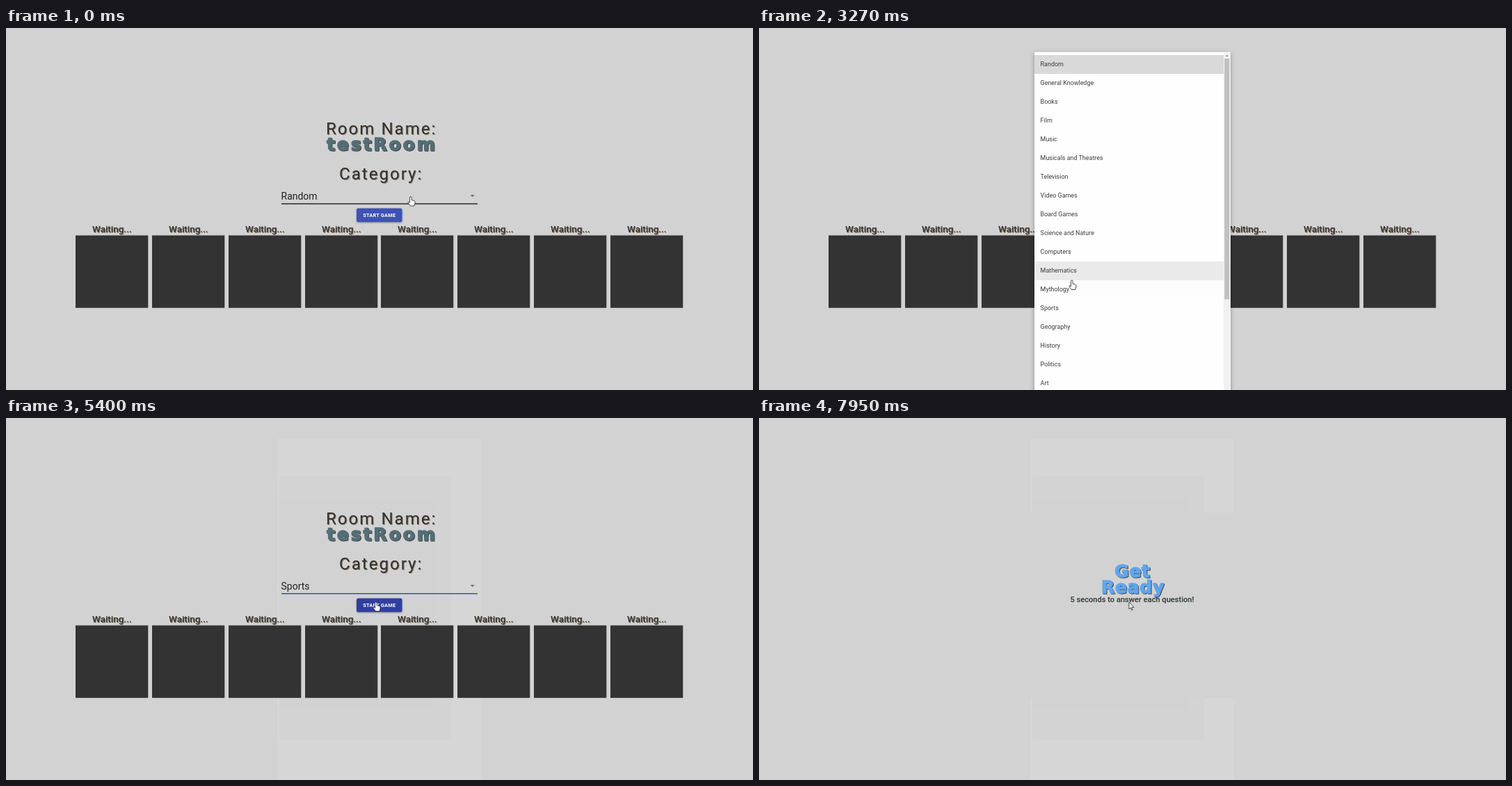
An HTML page for the animation above (8000 ms loop, 1074 px wide and 521 px high).

```html
<!DOCTYPE html>
<html lang="en">
<head>
<meta charset="utf-8">
<title>Quiz room</title>
<style>
  html, body { margin: 0; width: 100%; height: 100%; overflow: hidden; background: #d2d2d2; }
  svg { display: block; width: 100vw; height: 100vh; font-family: Roboto, sans-serif; }
  .mid { text-anchor: middle; }
  .title { font-size: 24px; letter-spacing: 2.05px; }
  .shade { fill: #333; filter: drop-shadow(1.1px 1.1px .2px #8d7b68); }
  .wait { font-size: 13.4px; font-weight: 500; }
  .fat { font: bold 25px "DejaVu Sans", sans-serif; stroke-width: 1.3; stroke-linejoin: round;
         filter: drop-shadow(1.2px 1.2px .3px #45484a); }
  .room-name { fill: #546e76; stroke: #546e76; letter-spacing: 2.9px; }
  .ready { fill: #60a6ee; stroke: #60a6ee; letter-spacing: .7px; }
  .note { font-size: 11.1px; font-weight: 500; fill: #3c4242; filter: drop-shadow(.6px .6px .3px #888); }
  .value { font-size: 14px; fill: #222; }
  .button { filter: drop-shadow(0 1px .8px rgba(0,0,0,.35)); }
  .label { font-size: 7.4px; font-weight: 700; letter-spacing: .2px; fill: #fff; }
  .item { font-size: 8.95px; fill: #3c3c3c; }
  .panel { fill: #fefefe; filter: drop-shadow(0 2px 3px rgba(0,0,0,.32)); }
</style>
</head>
<body>
<svg viewBox="0 0 1074 521">
  <rect width="1074" height="521" fill="#d2d2d2"/>

  <!-- faint trace the closed list leaves behind -->
  <g id="trace" fill="#fff" fill-rule="evenodd">
    <path opacity=".08" d="M390 30h293v491h-293zM393 84h247v379h-247z"/>
    <path opacity=".025" d="M393 84h247v379h-247zM393 115h224v305h-224z"/>
  </g>

  <g id="room">
    <text class="title shade" x="460" y="153">Room Name:</text>
    <text class="fat room-name" x="461" y="176">testRoom</text>
    <text class="title shade" x="479" y="217.5">Category:</text>
    <text class="value" id="value" x="395.5" y="246.5"></text>
    <path d="M667.7 240.2h6l-3 3z" fill="#666"/>
    <rect id="line" x="396" y="252.4" width="282"/>
    <rect id="focus" y="252.2" height="1.2" fill="#303f9f"/>
    <rect class="button" id="button" x="504" y="259.5" width="65.5" height="19.7" rx="2.2"/>
    <text class="label mid" x="536.8" y="271.9">START GAME</text>
    <g id="cards"></g>
  </g>

  <g id="menu">
    <rect class="panel" x="396" y="34.5" width="282" height="497" rx="2"/>
    <g id="items"></g>
    <clipPath id="row"><rect x="396" y="390" width="272" height="27"/></clipPath>
    <circle id="ripple" cx="436" cy="403" clip-path="url(#row)" opacity=".13"/>
    <rect x="668" y="35.5" width="9.5" height="495" fill="#f1f1f1"/>
    <rect x="669.2" y="44" width="7.2" height="346.5" fill="#c1c1c1"/>
    <path d="M670.8 41l2-2.5 2 2.5zM670.8 523l2 2.5 2-2.5z" fill="#888"/>
  </g>

  <g id="ready">
    <rect x="100" y="136" width="873" height="267" fill="#d2d2d2"/>
    <g id="message">
      <text class="fat ready mid" x="537" y="229">Get</text>
      <text class="fat ready mid" x="537.5" y="251.5">Ready</text>
      <text class="note mid" x="536.5" y="264.8">5 seconds to answer each question!</text>
    </g>
  </g>

  <g id="cursor" fill="#fff" stroke="#333" stroke-width=".9" stroke-linejoin="round">
    <path id="hand" d="M-1.4 7V1Q-1.4-.3-.1-.3T1.2 1V4.6L4.8 5.6Q6 6 6 7.5V9.5L5 13H-.6L-3.8 8.6Q-4.2 7.2-3 7L-1.4 8.4Z"/>
    <path id="arrow" d="M0 0V10L2.3 8L3.9 11.6L5.3 11L3.8 7.5H7Z"/>
  </g>
</svg>

<script>
const LOOP = 8000, FOCUS = 960, OPEN = 1112, PRESS = 4592, CLOSE = 4645, GROW = 424,
      BLUR = 6780, READY = 6950;
const ROW_TOP = 39, ROW = 27, SPORTS = 13;
const ITEMS = ['Random', 'General Knowledge', 'Books', 'Film', 'Music', 'Musicals and Theatres',
  'Television', 'Video Games', 'Board Games', 'Science and Nature', 'Computers', 'Mathematics',
  'Mythology', 'Sports', 'Geography', 'History', 'Politics', 'Art'];

// time, x, y of the pointer tip
const PATH = [[0, 582, 243], [1500, 582, 243], [1910, 462, 184], [2190, 462, 184],
  [2950, 452, 335], [3000, 452, 335], [3800, 444, 442], [3850, 444, 442], [4050, 442, 464],
  [4265, 436, 403], [4640, 436, 403], [4820, 482, 369.5], [5400, 532, 265], [LOOP, 532, 265]];

const $ = id => document.getElementById(id);
const set = (el, attrs) => { for (const k in attrs) el.setAttribute(k, attrs[k]); };
const show = (id, on) => { $(id).style.display = on ? '' : 'none'; };
const clamp = x => Math.min(1, Math.max(0, x));

function bezier(x1, y1, x2, y2) {
  const at = (a, b, s) => 3 * a * s * (1 - s) ** 2 + 3 * b * s * s * (1 - s) + s ** 3;
  return x => {
    x = clamp(x);
    if (x === 0 || x === 1) return x;
    let lo = 0, hi = 1;
    for (let i = 0; i < 20; i++) {
      const s = (lo + hi) / 2;
      if (at(x1, x2, s) < x) lo = s; else hi = s;
    }
    return at(y1, y2, lo);
  };
}
const standard = bezier(.4, 0, .2, 1);
const ease = bezier(.25, .1, .25, 1);

function pointer(t) {
  const i = Math.max(1, PATH.findIndex(p => p[0] > t));
  const [t0, x0, y0] = PATH[i - 1], [t1, x1, y1] = PATH[i];
  const u = (t - t0) / (t1 - t0), e = u * u * (3 - 2 * u);
  return [x0 + (x1 - x0) * e, y0 + (y1 - y0) * e];
}

function hoveredRow(t) {
  if (t < OPEN + 150 || t > CLOSE) return -1;
  return Math.floor((pointer(t)[1] - ROW_TOP) / ROW);
}

$('cards').innerHTML = Array.from({ length: 8 }, (_, i) => {
  const x = Math.round(100 + i * 109.86);
  return `<rect x="${x}" y="298.5" width="104.3" height="104.3" fill="#333"/>
    <text class="wait shade mid" x="${x + 52.3}" y="294">Waiting...</text>`;
}).join('');

$('items').innerHTML = ITEMS.map((name, i) => {
  const y = ROW_TOP + i * ROW;
  return `<rect x="396" y="${y}" width="272" height="${ROW}"/>
    <text class="item" x="404.6" y="${y + 16.2}">${name}</text>`;
}).join('');
const rows = $('items').querySelectorAll('rect');

function drawMenu(t) {
  const closing = t >= CLOSE;
  const u = (t - (closing ? CLOSE : OPEN)) / GROW;
  const visible = closing ? u < 1 : u > 0;
  show('menu', visible);
  if (!visible) return;

  const grown = closing ? 1 - standard((u - .333) / .666) : standard(u / .666);
  const v = .75 + .25 * grown;
  set($('menu'), {
    opacity: closing ? 1 - standard(u) : standard(u),
    transform: `translate(396 245) scale(${v} ${v * v}) translate(-396 -245)`
  });

  // averaging the last 150 ms gives each row its linear fade
  const shade = new Array(ITEMS.length).fill(0);
  for (let k = 0; k < 15; k++) {
    const row = hoveredRow(t - k * 10);
    if (row in shade) shade[row] += .085 / 15;
  }
  shade[closing ? SPORTS : 0] = closing ? .1 : .145;
  rows.forEach((row, i) => row.setAttribute('opacity', shade[i]));
  set($('ripple'), { r: 320 * standard((t - PRESS) / 550) });
}

function draw(t) {
  const [x, y] = pointer(t);
  const closed = t > CLOSE + GROW, ready = t >= READY;
  const onButton = closed && y < 279;

  show('room', !ready);
  show('trace', closed);
  show('ready', ready);

  $('value').textContent = ITEMS[t < CLOSE ? 0 : SPORTS];
  const hover = t < FOCUS;
  set($('line'), { height: hover ? 1.3 : .8, fill: hover ? '#111' : '#858585' });
  const focus = hover ? 0 : t < BLUR ? 1 : 1 - standard((t - BLUR + 82) / 200);
  set($('focus'), { x: 537 - 141 * focus, width: 282 * focus });
  set($('button'), { fill: onButton ? '#303f9f' : '#3f51b5' });

  drawMenu(t);

  const enter = ease((t - READY) / 1000);
  set($('message'), { opacity: enter, transform: `translate(${-180 * (1 - enter)} 0)` });

  const hand = !ready && (!closed || onButton);
  show('hand', hand);
  show('arrow', !hand);
  set($('cursor'), { transform: `translate(${x} ${y})` });
}

const start = performance.now();
function tick() {
  draw((performance.now() - start) % LOOP);
  requestAnimationFrame(tick);
}
tick();
</script>
</body>
</html>
```
